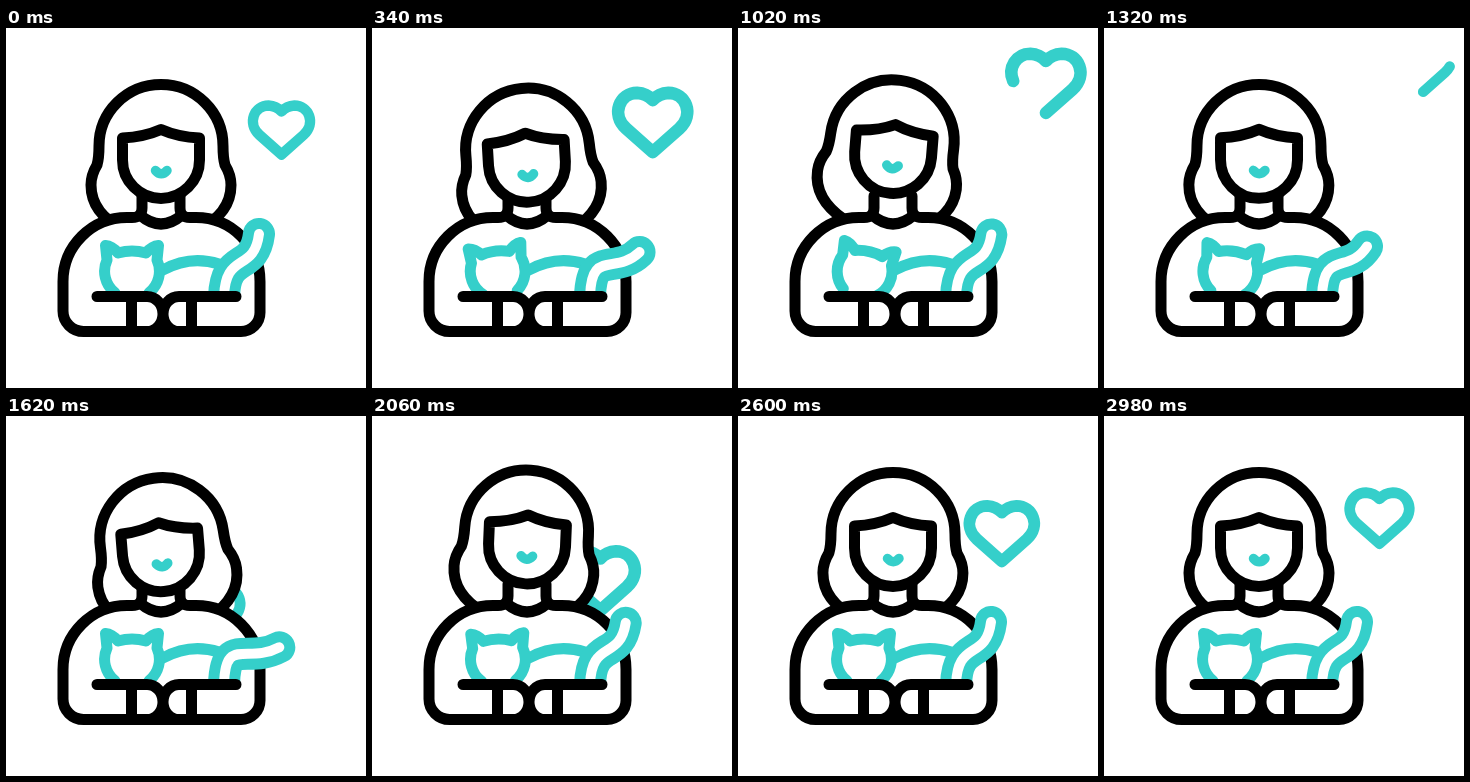
An HTML page with a canvas for the animation above (3000 ms loop, 360 by 360 pixels).

```html
<!DOCTYPE html>
<html lang="en">
<head>
<meta charset="utf-8">
<title>Cat cuddle</title>
<style>
  html, body { margin: 0; width: 100%; height: 100%; overflow: hidden; background: #fff; }
  canvas { display: block; width: 360px; height: 360px; }
</style>
</head>
<body>
<canvas id="stage" width="360" height="360"></canvas>
<script>
const ctx = document.getElementById('stage').getContext('2d');
const LOOP = 3000, STEP = 530, BEAT = 680;
const INK = '#000', TEAL = '#35cfca', PAPER = '#fff', LINE = 11;
const HEART_LENGTH = 163;

const shapes = {
  hair: 'M118 202 C98 192 85 177 85 157 C85 149 88 142 91 137 Q93 130 93 118 A62 61.5 0 0 1 217 118 Q217 130 219 137 C222 142 225 149 225 157 C225 177 212 192 192 202',
  face: 'M116.5 110 Q138 109 155 101.5 Q172 109 193.5 110 V132 A38.5 38.5 0 0 1 116.5 132 Z',
  mouth: 'M149.5 142.5 Q155.3 149 161 142.5',
  body: 'M136 168 V180 Q136 189.5 126 189.5 H121 A64 64 0 0 0 57 253.5 V283 A20.5 20.5 0 0 0 77.5 303.5 H235 A19 19 0 0 0 254 284.5 V253.5 A64 64 0 0 0 190 189.5 H184 Q174 189.5 174 180 V168',
  collar: 'M134 187 Q155 205 176 187',
  back: 'M157 242 Q184 227 213 236',
  catHead: 'M109 264.8 A27.5 27.5 0 0 1 101 232 L99.5 217.5 Q106 218 112 225 Q126 221 140 225 Q146 218 152.5 217.5 L151 232 A27.5 27.5 0 0 1 143 264.8',
  arms: 'M91 268.5 H141 A16 17.5 0 0 1 141 303.5 M230 268.5 H173 A16 17.5 0 0 0 173 303.5 M125.5 268.5 V303.5 M185.5 268.5 V303.5',
  heart: 'M0 24.5 L-22 5 C-35 -7 -27 -24.5 -13 -24.5 Q-5 -24 0 -18.5 Q5 -24 13 -24.5 C27 -24.5 35 -7 22 5 L0 24.5 Z'
};
for (const key in shapes) shapes[key] = new Path2D(shapes[key]);

const clamp = v => Math.min(1, Math.max(0, v));
const mix = (a, b, k) => a + (b - a) * k;
const smooth = v => (v = clamp(v), v * v * (3 - 2 * v));

// Eases from one rest pose to the next, one per STEP
function swing(t, ...poses) {
  const i = Math.floor(t / STEP);
  return mix(poses[i] || 0, poses[i + 1] || 0, smooth(t / STEP - i));
}

function line(path, color, width = LINE, fill = false) {
  if (fill) {
    ctx.fillStyle = PAPER;
    ctx.fill(path);
  }
  ctx.strokeStyle = color;
  ctx.lineWidth = width;
  ctx.stroke(path);
}

function posed(x, y, deg, dx, dy, draw) {
  ctx.save();
  ctx.translate(x + dx, y + dy);
  ctx.rotate(deg * Math.PI / 180);
  ctx.translate(-x, -y);
  draw();
  ctx.restore();
}

// Drifts off to the upper right while being erased, then rises from behind her
function drawHeart(t) {
  const leaving = t < 1440;
  const out = smooth(t / 1700), back = smooth((LOOP - t) / 1600);
  const trim = leaving ? clamp((t - 900) / 520) : 0;
  if (trim === 1) return;
  const beat = Math.cos((t - (leaving ? 340 : 2060)) / BEAT * 2 * Math.PI);
  const scale = (74 + 7 * beat) / 67;
  ctx.save();
  ctx.translate(275.5 + (leaving ? 50 * out : -75 * back), 102 + (leaving ? -72 * out : 100 * back));
  ctx.scale(scale, scale);
  if (trim > 0) {
    ctx.setLineDash([HEART_LENGTH + 10]);
    ctx.lineDashOffset = -trim * HEART_LENGTH;
  }
  line(shapes.heart, TEAL, 10.4);
  ctx.restore();
}

function drawTail(k) {
  const tail = new Path2D();
  tail.moveTo(218, 272);
  tail.bezierCurveTo(218, mix(222, 218, k), mix(248, 240, k), mix(246, 249, k), mix(253, 273.5, k), mix(206, 231.5, k));
  line(tail, TEAL, 32);
  line(tail, PAPER, 10);
}

function drawCat(t) {
  ctx.save();
  ctx.beginPath();
  ctx.rect(0, 0, 360, 268);
  ctx.clip();
  line(shapes.back, TEAL);
  drawTail(swing(t, 0, 1, 0, 1));
  posed(126, 246, swing(t, 0, -10, 13, 0, -1.5), 0, 0, () => line(shapes.catHead, TEAL, LINE, true));
  ctx.restore();
}

function draw(t) {
  const sway = swing(t, 0, -1, 1, -1, 0.55);
  ctx.fillStyle = PAPER;
  ctx.fillRect(0, 0, 360, 360);
  ctx.lineCap = ctx.lineJoin = 'round';
  drawHeart(t);
  posed(155, 137, 8 * sway, -3.5 * sway, -5 * sway, () => line(shapes.hair, INK, LINE, true));
  line(shapes.body, INK, LINE, true);
  line(shapes.collar, INK);
  posed(155, 140, 4.7 * sway, -0.6 * sway, -5.2 * sway, () => {
    line(shapes.face, INK, LINE, true);
    line(shapes.mouth, TEAL, 9.5);
  });
  drawCat(t);
  line(shapes.arms, INK);
}

const start = performance.now();
function tick() {
  draw((performance.now() - start) % LOOP);
  requestAnimationFrame(tick);
}
tick();
</script>
</body>
</html>
```
